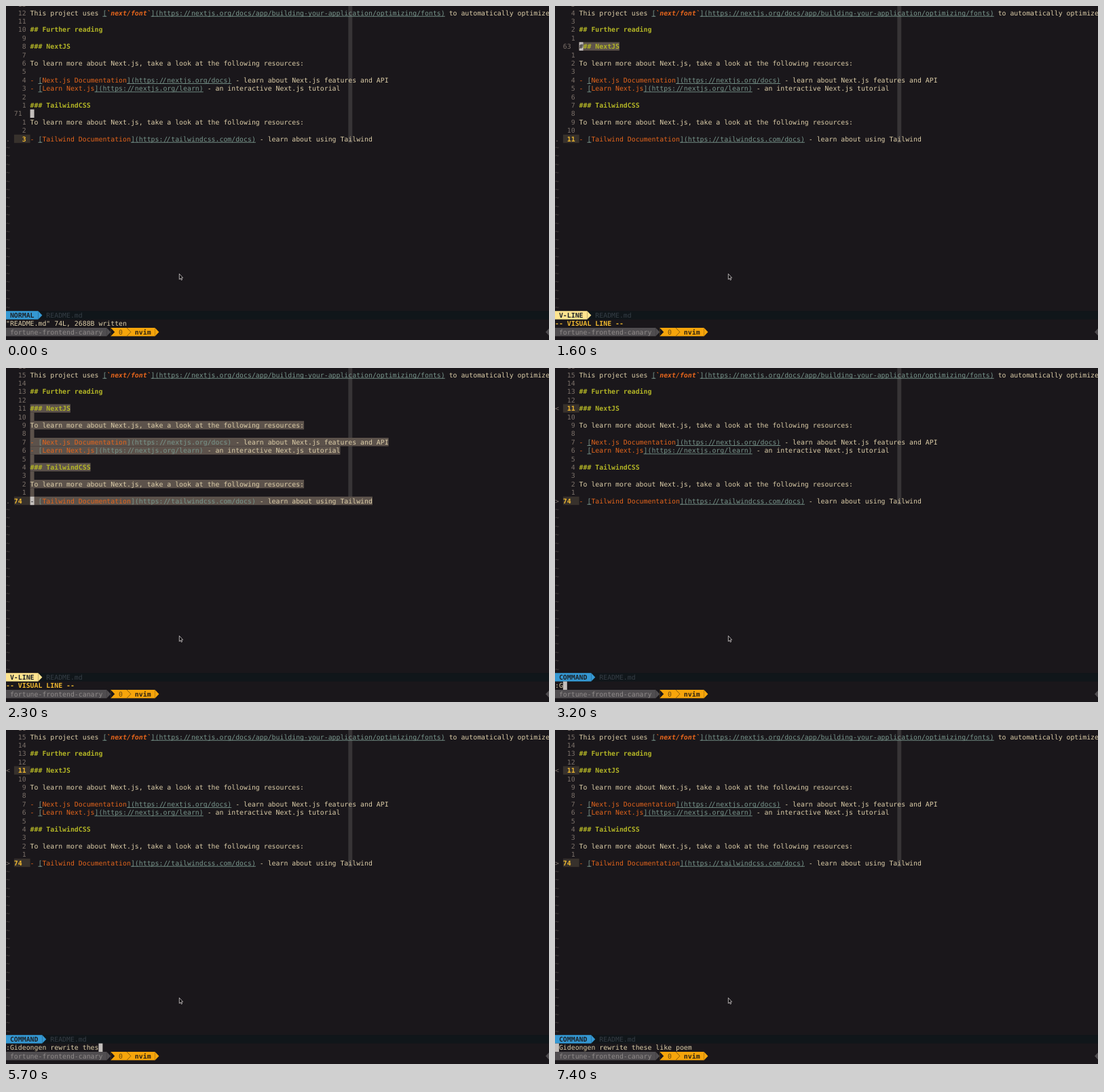
Animation, 800 px wide and 493 px high, one loop 8 s. Source, as an HTML page with a canvas:

```html
<!DOCTYPE html>
<html lang="en">
<head>
<meta charset="utf-8">
<title>Editing README.md</title>
<style>
html, body { margin: 0; width: 100%; height: 100%; overflow: hidden; background: #1a171b; }
canvas { display: block; }
</style>
</head>
<body>
<canvas id="stage" width="800" height="493"></canvas>
<script>
const ctx = document.getElementById('stage').getContext('2d');
const LOOP = 8000, CELL = 5.933, ROW = 12.4, TOP = 3.8;
const GUTTER = 6, FIRST = 59, LAST = 74, MARK = 63;
const STATUS = 36, PROMPT = 37, TMUX = 38;
const C = {
  bg: '#1a171b', text: '#dccda8', head: '#b3b526', link: '#e4651c', url: '#78968c',
  num: '#7b7069', tilde: '#4b4543', hot: '#efb830', hotBg: '#37312c', ruler: '#373436',
  select: '#5c524b', cursor: '#c4bfbc', status: '#10161a', file: '#353e46',
  blue: '#3498d3', cream: '#ffe48f', grey: '#504d50', session: '#8f8a89', orange: '#f6a50b'
};
const learn = 'To learn more about Next.js, take a look at the following resources:';
const lines = [
  'This project uses [`next/font`](https://nextjs.org/docs/app/building-your-application/optimizing/fonts) to automatically optimize',
  '', '## Further reading', '', '### NextJS', '', learn, '',
  '- [Next.js Documentation](https://nextjs.org/docs) - learn about Next.js features and API',
  '- [Learn Next.js](https://nextjs.org/learn) - an interactive Next.js tutorial',
  '', '### TailwindCSS', '', learn.replace('NextJS', 'TailwindCSS'), '',
  '- [Tailwind Documentation](https://tailwindcss.com/docs) - learn about using Tailwind'
];

// Command typing: [time, visible length]
const command = ':Gideongen rewrite these like poem';
const typing = [
  [2700, 1], [3200, 2], [3300, 3], [3400, 10], [3600, 11], [3700, 12], [3900, 13],
  [4000, 14], [4100, 15], [4300, 16], [4400, 17], [4500, 18], [4700, 19], [4900, 20],
  [5000, 21], [5400, 22], [5700, 23], [5900, 24], [6000, 25], [6200, 26], [6300, 27],
  [6400, 28], [6500, 29], [6600, 30], [6700, 31], [6800, 32], [6900, 33], [7000, 34]
];
const VISUAL = 1400, JUMP = 1700, ESCAPE = 2500, COLON = 2700, ENTER = 7200;

const x = col => col * CELL;
const y = row => TOP + row * ROW;

function fill(col, row, cells, color) {
  ctx.fillStyle = color;
  ctx.fillRect(x(col), y(row), cells * CELL, ROW);
}

// Every glyph sits in its own cell; double slashes are drawn closer together.
function put(text, col, row, color, style = '') {
  ctx.font = `${style} 9.85px "DejaVu Sans Mono", monospace`;
  ctx.fillStyle = color;
  [...text].forEach((ch, i) => {
    const pull = ch !== '/' ? 0 : text[i + 1] === '/' ? 0.9 : text[i - 1] === '/' ? -0.9 : 0;
    ctx.fillText(ch, x(col + i) + pull, y(row) + 9.7);
  });
  return col + text.length;
}

function polygon(points, color) {
  ctx.fillStyle = color;
  ctx.beginPath();
  points.forEach(([px, py]) => ctx.lineTo(px, py));
  ctx.closePath();
  ctx.fill();
}

function arrow(col, row, color, dir = 1) {
  const base = x(dir > 0 ? col : col + 1), top = y(row);
  polygon([[base, top], [base + dir * CELL, top + ROW / 2], [base, top + ROW]], color);
}

function markdown(line, row, selected) {
  if (line[0] === '#') return put(line, GUTTER, row, C.head, 'bold');
  let col = GUTTER;
  for (const part of line.split(/(\[(?=.*\]\()|(?<=\[).*(?=\]\()|\]\(.*?\))/)) {
    if (!part) continue;
    const start = col, isUrl = part === '[' || part.startsWith('](');
    if (isUrl) {
      col = put(part, col, row, C.url);
      if (!selected) {
        ctx.fillRect(x(start), y(row) + 11, x(col - start), 0.9);
      }
    } else if (line[start - GUTTER - 1] === '[') {
      col = put(part, col, row, C.link, part[0] === '`' ? 'italic bold' : '');
    } else {
      col = put(part, col, row, part === '- ' ? C.link : C.text);
    }
  }
}

function gutter(n, current, marks) {
  const row = n - FIRST, sign = marks[n];
  if (sign) {
    fill(2, row, 4, C.hotBg);
    put(sign, 0, row, C.num);
  }
  const label = n === current ? String(n) : String(Math.abs(n - current)).padStart(3);
  put(label, 2, row, sign ? C.hot : C.num, sign ? 'bold' : '');
}

function statusLine(mode, color) {
  fill(0, STATUS, 136, C.status);
  fill(0, STATUS, mode.length + 2, color);
  put(mode, 1, STATUS, '#1c2228', 'bold');
  arrow(mode.length + 2, STATUS, color);
  put('README.md', mode.length + 4, STATUS, C.file);
}

function tmuxLine() {
  fill(0, TMUX, 25, C.grey);
  put('fortune-frontend-canary', 1, TMUX, C.session);
  arrow(25, TMUX, C.grey);
  fill(26, TMUX, 11, C.orange);
  arrow(26, TMUX, C.bg);
  put('0', 28, TMUX, '#6b4a12');
  ctx.strokeStyle = '#80580f';
  ctx.lineWidth = 0.9;
  ctx.beginPath();
  ctx.moveTo(x(30), y(TMUX));
  ctx.lineTo(x(31), y(TMUX) + ROW / 2);
  ctx.lineTo(x(30), y(TMUX) + ROW);
  ctx.stroke();
  put('nvim', 32, TMUX, '#2a2015', 'bold');
  arrow(37, TMUX, C.orange);
  arrow(134, TMUX, C.grey, -1);
}

function pointer() {
  const shape = [[255.3, 395.3], [255.3, 403.6], [257.1, 402], [258.3, 404.6],
    [259.6, 404], [258.4, 401.4], [260.6, 401.2]];
  polygon(shape, '#0c0a0c');
  ctx.strokeStyle = '#d8d4d4';
  ctx.lineWidth = 0.8;
  ctx.stroke();
}

function prompt(t) {
  if (t < VISUAL) put('"README.md" 74L, 2688B written', 0, PROMPT, C.text);
  else if (t < ESCAPE) put('-- VISUAL LINE --', 0, PROMPT, C.hot, 'bold');
  else if (t >= COLON) {
    const length = typing.filter(([at]) => at <= t).pop()[1];
    put(command.slice(0, length), 0, PROMPT, C.text);
    fill(t < ENTER ? length : 0, PROMPT, 1, C.cursor);
  }
}

function draw(t) {
  const visual = t >= VISUAL && t < ESCAPE;
  const current = t >= JUMP ? LAST : Math.max(MARK, 71 - Math.floor(t / 157));
  const marks = t < ESCAPE ? { [LAST]: '.' } : { [MARK]: '<', [LAST]: '>' };

  ctx.fillStyle = C.bg;
  ctx.fillRect(0, 0, 800, 493);
  ctx.fillStyle = C.ruler;
  ctx.fillRect(x(GUTTER + 79), 0, CELL, y(16));

  gutter(FIRST - 1, current, marks);
  lines.forEach((line, row) => {
    const n = FIRST + row, selected = visual && n >= MARK && n <= current;
    gutter(n, current, marks);
    if (selected) fill(GUTTER, row, Math.max(1, line.length), C.select);
    markdown(line, row, selected);
    if (n === current && t < COLON) {
      fill(GUTTER, row, 1, C.cursor);
      put(line.slice(0, 1), GUTTER, row, C.bg);
    }
  });
  for (let row = lines.length; row < STATUS; row++) put('~', 0, row, C.tilde);

  if (visual) statusLine('V-LINE', C.cream);
  else statusLine(t < COLON ? 'NORMAL' : 'COMMAND', C.blue);
  prompt(t);
  tmuxLine();
  pointer();
}

ctx.textRendering = 'geometricPrecision';
const begin = performance.now();
function tick() {
  draw((performance.now() - begin) % LOOP);
  requestAnimationFrame(tick);
}
tick();
</script>
</body>
</html>
```
